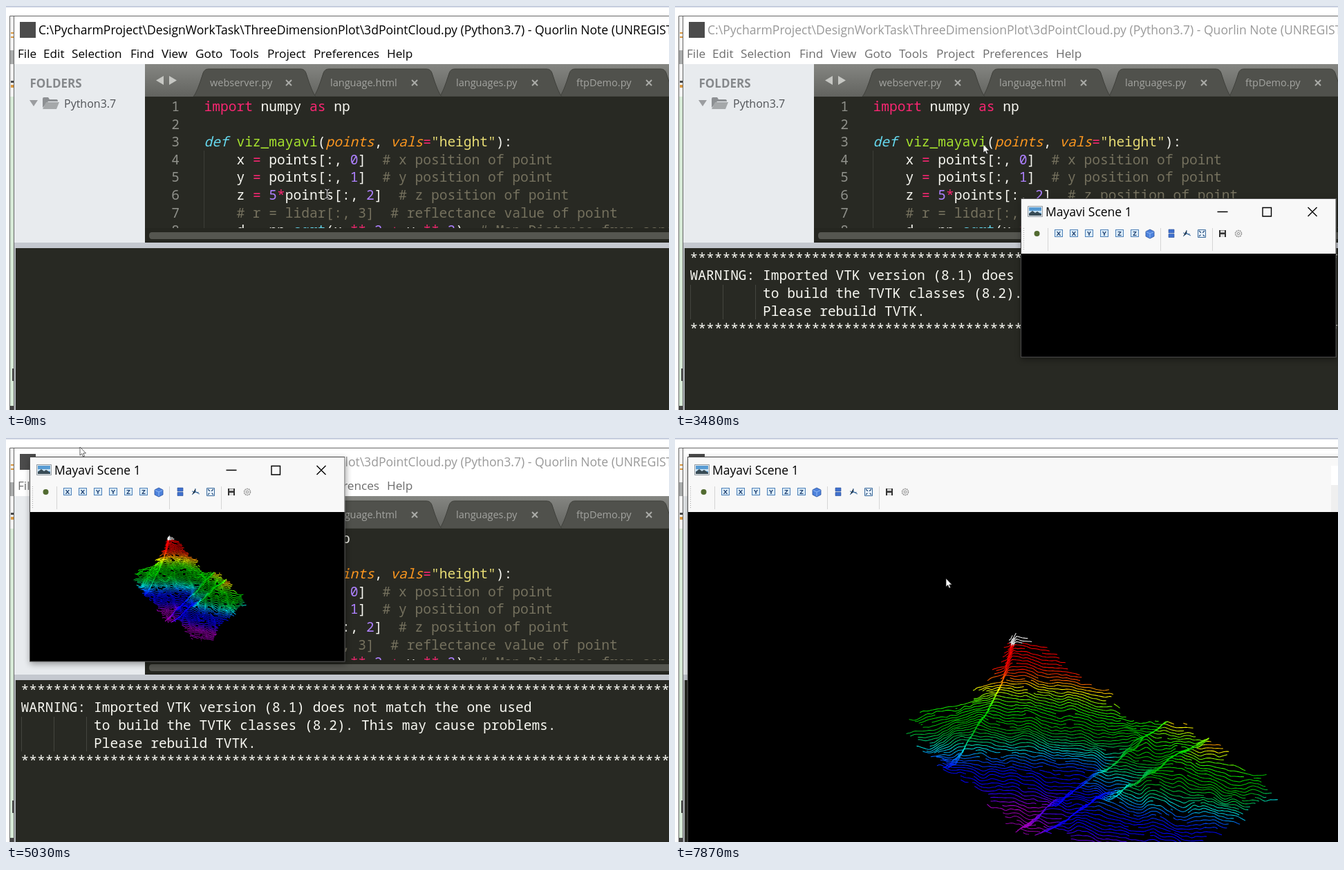
Write an HTML page that moves like this. It is 959 px wide and 584 px high and loops after 7990 ms.

```html
<!DOCTYPE html>
<html lang="en">
<head>
<meta charset="utf-8">
<title>Point cloud viewer</title>
<style>
html, body { margin: 0; width: 100%; height: 100%; overflow: hidden; background: #fff; }
svg { display: block; }
#stage { width: 959px; height: 584px; }
text { white-space: pre; font-family: "Open Sans", "Noto Sans", sans-serif; }
.mono text { font-family: "Noto Sans Mono", "DejaVu Sans Mono", monospace; font-size: 19.56px; fill: #f8f8f2; }
.k { fill: #f92672; } .n { fill: #ae81ff; } .s { fill: #e6db74; } .f { fill: #a6e22e; }
.c { fill: #75715e; } .b { fill: #66d9ef; }
.d { fill: #66d9ef; font-style: italic; } .a { fill: #fd971f; font-style: italic; }
#numbers text { fill: #8f908a; text-anchor: end; }
#tabs text { font-size: 14.5px; fill: #a3a4a0; }
#menu text { font-size: 17.2px; }
#mesh path { fill: none; stroke-width: 1.05; vector-effect: non-scaling-stroke; stroke-linejoin: round; }
</style>
</head>
<body>
<svg id="stage" viewBox="0 0 959 584">
  <defs>
    <linearGradient id="bar" x2="0" y2="1"><stop stop-color="#858682"/><stop offset="1" stop-color="#62635f"/></linearGradient>
    <filter id="soft" x="-10%" y="-10%" width="120%" height="120%"><feGaussianBlur stdDeviation="5"/></filter>
    <clipPath id="code-clip"><path d="M201 131H959V321H201z"/></clipPath>
  </defs>

  <g id="desktop">
    <path fill="#fff" d="M0 0H959V584H0z"/>
    <path fill="#c6cede" d="M0 0H959V2H0z"/>
    <path fill="#d6e9d6" d="M6 131H11V584H6z"/>
    <path fill="#f1f1f1" d="M6 15H11V131H6z"/>
    <path fill="#d7963f" d="M7 38h4v2h-4zM7 44h4v2h-4zM7 114h4v4h-4z"/>
    <path fill="#a9abab" d="M6 64h5v20h-5z"/>
    <path fill="#444" d="M7 108h4v3h-4zM9 524h2v18h-2zM6 578h5v6h-5z"/>
    <path fill="none" stroke="#666" d="M5.500 584V14.500H959M11.500 15V584"/>
  </g>

  <g id="editor">
    <path fill="#fff" d="M12 15H959V84H12z"/>
    <path fill="#4b4b4b" d="M20 23h23v23h-23z"/>
    <text id="title" x="47" y="41" font-size="17.55">C:\PycharmProject\DesignWorkTask\ThreeDimensionPlot\3dPointCloud.py (Python3.7) - Quorlin Note (UNREGISTERED)</text>
    <g id="menu"></g>
    <path fill="#e8ebee" d="M12 84H201V342H12z"/>
    <text x="34.500" y="118" font-size="17" font-weight="700" fill="#85888b">FOLDERS</text>
    <path fill="#9b9da0" d="M34 136h12l-6 9z"/>
    <path fill="#8d9093" d="M53 147v-13q0-2 2-2h6l2 3h10q2 0 2 3h-14z"/>
    <path fill="#a5a8aa" d="M53 149l5-10h19l-4 10z"/>
    <text x="84" y="146.500" font-size="16" fill="#505357">Python3.7</text>
    <path fill="url(#bar)" d="M201 84H959V131H201z"/>
    <path fill="#c6c7c3" d="M228 101v13l-11-6.500zM236 101v13l11-6.500z"/>
    <g id="tabs"></g>
    <path fill="#282923" d="M201 131H959V342H201z"/>
    <path id="line-mark" fill="#3a392f" d="M201 311H279V321H201z"/>
    <g class="mono" clip-path="url(#code-clip)">
      <path stroke="#3d3e37" d="M286.500 209V321"/>
      <g id="numbers"></g>
      <g id="code"></g>
    </g>
    <path fill="#252620" d="M201 321H959V342H201z"/>
    <path fill="#555650" d="M211 327H959V337H211q-4 0-4-5t4-5z"/>
    <path fill="#c4c8cf" d="M12 342H959V350H12z"/>
    <path fill="#b4b8bd" d="M12 350h2V584h-2z"/>
    <path fill="#282923" d="M14 350H959V584H14z"/>
    <g id="output" class="mono">
      <path stroke="#44453e" d="M22.500 403V453M69.500 403V453M116.500 403V453"/>
    </g>
    <path id="caret" fill="#f8f8f0" d="M20 351h2.500v28h-2.500z"/>
  </g>

  <rect id="shadow" fill="#000" opacity=".38" filter="url(#soft)"/>
  <svg id="viewer" overflow="hidden">
    <rect id="frame" fill="#f8f8f8"/>
    <path id="unpainted-title" fill="#fff"/>
    <path id="unpainted-tools" fill="#efefef"/>
    <g transform="translate(10 11)">
      <path fill="#e9edf0" stroke="#929ba3" d="M.5.5h21v15h-21z"/>
      <path fill="#579bd3" d="M2 2h18v12H2z"/>
      <path fill="#c5dff0" d="M2 7h18v3H2z"/>
      <path fill="#384b55" d="M2 14v-3l5-4 4 3 3-2 6 4v2z"/>
    </g>
    <text x="36" y="25.500" font-size="17.5">Mayavi Scene 1</text>
    <g id="buttons" fill="none" stroke="#000" stroke-width="1.4">
      <path d="M-172 19.500h15M-106.500 13.500h12.500v12.500h-12.500zM-41 13l13 13M-28 13l-13 13"/>
    </g>
    <g id="tools">
      <path stroke="#aaa" stroke-dasharray="1 2" d="M4.500 43V76"/>
      <path stroke="#d5d5d5" d="M39.500 43V76M202.500 43V76M277.500 43V76"/>
      <circle cx="23.500" cy="51" r="4" fill="#526b31"/>
      <path fill="#4d82dc" stroke="#254f9c" stroke-width=".8" d="M187 45l6 3v7l-6 3-6-3v-7z"/>
      <path fill="none" stroke="#91b8f3" d="M181.500 48.500l5.500 2.500 5.500-2.500M187 51v6"/>
      <path fill="#3f70ce" stroke="#294f96" stroke-width=".6" d="M214 45h8v5h-8zM214 51.500h8v5h-8z"/>
      <path stroke="#3c6c9e" d="M240 46v5l-5 4M240 51l6 3M235 50l10 2"/>
      <path fill="#e8f1fa" stroke="#3c6c9e" d="M256.500 45.500h11v11h-11z"/>
      <path stroke="#224b7a" stroke-width="1.3" stroke-dasharray="4 4" d="M258 47l8 8M266 47l-8 8"/>
      <path fill="#333" d="M287 46h10v10h-10z"/>
      <path fill="#ddd" d="M289 46.500h6v3h-6zM289 52h6v4h-6z"/>
      <circle cx="315" cy="51" r="4.500" fill="#eee" stroke="#999" stroke-width="1.6" stroke-dasharray="2 .8"/>
      <circle cx="315" cy="51" r="1.700" fill="none" stroke="#999"/>
    </g>
    <rect id="canvas" y="80" fill="#000"/>
    <g id="mesh"></g>
    <rect id="border" x=".5" y=".5" fill="none" stroke="#4b4b4b"/>
  </svg>

  <g id="pointer">
    <g id="beam" fill="none">
      <path stroke="#222" stroke-width="3" d="M-3-6.500Q0-6.500 0-4V4Q0 6.500-3 6.500M3-6.500Q0-6.500 0-4M0 4Q0 6.500 3 6.500"/>
      <path stroke="#eee" d="M-3-6.500Q0-6.500 0-4V4Q0 6.500-3 6.500M3-6.500Q0-6.500 0-4M0 4Q0 6.500 3 6.500"/>
    </g>
    <path id="arrow" fill="#fff" stroke="#222" stroke-width=".7" d="M0 0V12L2.700 9.600 4.600 14 6.500 13.200 4.700 9H8.500z"/>
    <path id="sizer" fill="#fff" stroke="#222" stroke-width=".7" d="M-6-6h5l-1.600 1.600 7 7L6 1V6H1L2.600 4.400l-7-7L-6-1z"/>
  </g>
</svg>

<script>
const LOOP = 7990, FRAME = 125;
const $ = id => document.getElementById(id);
const mix = (a, b, u) => a + (b - a) * u;
const clamp = u => Math.max(0, Math.min(1, u));
const span = (t, from, to) => clamp((t - from) / (to - from));

function make(parent, tag, attrs, content) {
  const el = document.createElementNS("http://www.w3.org/2000/svg", tag);
  for (const name in attrs) el.setAttribute(name, attrs[name]);
  if (content !== undefined) el.textContent = content;
  parent.append(el);
  return el;
}
const set = (id, attrs) => {
  for (const name in attrs) $(id).setAttribute(name, attrs[name]);
};
const show = (id, on) => $(id).setAttribute("visibility", on ? "visible" : "hidden");

// Straight travel through a few [time, x, y] points.
function glide(points, t) {
  const next = points.findIndex(p => p[0] > t);
  if (next === 0) return points[0].slice(1);
  if (next < 0) return points[points.length - 1].slice(1);
  const a = points[next - 1], b = points[next];
  const u = span(t, a[0], b[0]);
  return [mix(a[1], b[1], u), mix(a[2], b[2], u)];
}

// ---- static text ----
[["File", 17], ["Edit", 54], ["Selection", 95], ["Find", 180], ["View", 225], ["Goto", 274],
 ["Tools", 324], ["Project", 378], ["Preferences", 445], ["Help", 551]]
  .forEach(([word, x]) => make($("menu"), "text", { x, y: 75 }, word));

[["ftpDemo.py", 825, 930], ["languages.py", 651, 765], ["language.html", 469, 591], ["webserver.py", 295, 409]]
  .forEach(([name, x, cross]) => {
    const l = x - 24, r = cross + 39;
    make($("tabs"), "path", { fill: "#50514c", stroke: "#3f403b",
      d: `M${l} 131Q${l + 5} 126 ${l + 14} 97Q${l + 16} 91 ${l + 22} 91H${r - 22}Q${r - 16} 91 ${r - 14} 97Q${r - 5} 126 ${r} 131z` });
    make($("tabs"), "text", { x, y: 116 }, name);
    make($("tabs"), "path", { stroke: "#abaca8", "stroke-width": 2, d: `M${cross - 4} 107l8 8m0-8l-8 8` });
  });

const code = [
  [["k", "import"], ["", " numpy "], ["k", "as"], ["", " np"]],
  [],
  [["d", "def"], ["f", " viz_mayavi"], ["", "("], ["a", "points"], ["", ", "], ["a", "vals"], ["k", "="], ["s", '"height"'], ["", "):"]],
  [["", "    x "], ["k", "="], ["", " points[:, "], ["n", "0"], ["", "]  "], ["c", "# x position of point"]],
  [["", "    y "], ["k", "="], ["", " points[:, "], ["n", "1"], ["", "]  "], ["c", "# y position of point"]],
  [["", "    z "], ["k", "="], ["n", " 5"], ["k", "*"], ["", "points[:, "], ["n", "2"], ["", "]  "], ["c", "# z position of point"]],
  [["c", "    # r = lidar[:, 3]  # reflectance value of point"]],
  [["", "    d "], ["k", "="], ["", " np."], ["b", "sqrt"], ["", "(x "], ["k", "**"], ["n", " 2 "], ["k", "+"], ["", " y "], ["k", "**"], ["n", " 2"], ["", ")  "], ["c", "# Map Distance from sensor"]]
];
code.forEach((tokens, i) => {
  const y = 152 + i * 25.6;
  make($("numbers"), "text", { x: 251, y }, i + 1);
  const line = make($("code"), "text", { x: 286.5, y });
  tokens.forEach(([kind, part]) => make(line, "tspan", { class: kind }, part));
});

const stars = "*".repeat(82);
[stars, "WARNING: Imported VTK version (8.1) does not match the one used",
 "         to build the TVTK classes (8.2). This may cause problems.",
 "         Please rebuild TVTK.", stars]
  .forEach((line, i) => make($("output"), "text", { x: 21.5, y: 370.8 + i * 25.6 }, line));

[..."XXYYZZ"].forEach((axis, i) => {
  const x = 55 + i * 22;
  make($("tools"), "rect", { x: x - 5.5, y: 45.5, width: 11, height: 10, fill: "#dcecf8", stroke: "#4c80b8" });
  make($("tools"), "text", { x, y: 54.3, "font-size": 9.5, "font-weight": 700, fill: "#1d3f70", "text-anchor": "middle" }, axis);
});

// ---- terrain: scan lines that climb along three ridges ----
const SUMMIT = [406, 190], THROW = 27;
const outline = [
  [403, 189], [414, 189], [450, 214], [474, 248], [498, 262], [520, 310], [582, 320], [622, 352], [634, 374],
  [673, 408], [668, 427], [636, 440], [628, 468], [574, 500], [568, 554], [494, 543], [452, 500], [446, 478],
  [402, 486], [345, 412], [308, 362], [289, 345], [300, 310], [352, 296], [386, 255]];

const spur = y => 408 - 0.15 * Math.max(0, y - 200) - 0.0013 * Math.max(0, y - 200) ** 2;
const ridges = [
  { at: y => 550 - 1.04 * (y - 330), lean: 1.04 },
  { at: y => 590 - 1.33 * (y - 355), lean: 1.33 }
];

function rand(i, j) {
  const s = Math.sin(i * 127.1 + j * 311.7) * 43758.5453;
  return s - Math.floor(s) - 0.5;
}
function noise(x, y) {
  const i = Math.floor(x), j = Math.floor(y);
  const ease = u => u * u * (3 - 2 * u);
  const u = ease(x - i), v = ease(y - j);
  return mix(mix(rand(i, j), rand(i + 1, j), u), mix(rand(i, j + 1), rand(i + 1, j + 1), u), v);
}

function inside(x, y) {
  let hit = false;
  outline.forEach(([ax, ay], i) => {
    const [bx, by] = outline[(i + 1) % outline.length];
    if (ay > y !== by > y && x < (bx - ax) * (y - ay) / (by - ay) + ax) hit = !hit;
  });
  return hit;
}

function surface(x, base) {
  const crest = spur(base);
  let y = base + (x < crest ? 0.35 * (crest - x) : 0.2 * (x - crest)) - 20 * clamp((x - crest) / 9 + 0.5);
  for (const { at, lean } of ridges) y -= THROW * clamp((x - at(y)) / (THROW * lean));
  const rough = 0.35 + 0.65 * span(y, 220, 350);
  return y + rough * (15 * noise(x / 26, base / 42) + 8 * noise(x / 11, base / 24)) + 3 * noise(x / 5, base / 8);
}

// Drop below the summit; the ground beyond each ridge lies higher.
function depth(x, y) {
  let drop = y - 0.2 * Math.max(0, x - 450) + Math.max(0, x - 640);
  for (const { at } of ridges) drop -= THROW * clamp((x - at(y)) / 10 + 0.5);
  return drop;
}

// Rainbow that lingers on red, green and blue.
function tint(drop) {
  if (drop < 203) return "#eee";
  const h = Math.max(0, (drop - 225) * 4 / 3);
  const hue = Math.min(292, h - 17 * Math.sin(h * Math.PI / 60));
  const light = 48 - 13 * Math.exp(-(((drop - 333) / 28) ** 2)) - 17 * span(drop, 425, 460);
  return `hsl(${hue.toFixed(0)} 100% ${light.toFixed(0)}%)`;
}

function buildMesh() {
  const bands = {};
  for (let k = 0; k < 112; k++) {
    const base = 150 + k * 4.2;
    const ragX = 20 * rand(k, 3), ragY = 8 * rand(k, 9);
    let last = null, lastBand = null;
    for (let x = 286; x <= 678; x += 2) {
      const y = surface(x, base);
      const gap = noise(x / 14, k * 7) > 0.4;
      if (gap || !inside(x + ragX * span(y, 200, 260), y + ragY)) { last = null; continue; }
      const point = `${(x - SUMMIT[0]).toFixed(1)} ${(y - SUMMIT[1]).toFixed(1)}`;
      const band = Math.round(depth(x, y) / 5) * 5;
      if (last) {
        bands[band] = (bands[band] || "") + (band === lastBand ? "L" + point : `M${last}L${point}`);
        lastBand = band;
      } else lastBand = null;
      last = point;
    }
  }
  for (const band in bands) make($("mesh"), "path", { d: bands[band], stroke: tint(+band) });
}
buildMesh();

// ---- motion ----
const windowPath = [[4000, 500, 278], [4250, 336, 139], [4375, 224, 51], [4500, 140, 27],
  [4750, 60, 27], [4875, 37, 27], [5000, 34, 27], [5250, 18, 27]];
const arrowPath = [[3500, 446, 200], [3625, 440, 205], [3875, 440, 205], [4250, 248, 61], [4375, 191, 21],
  [4750, 110, 10], [5000, 107, 13], [5250, 99, 13], [5375, 99, 13], [6125, 227, 151]];

const resizing = t => span(t, 6625, 7125);
const widening = t => 0.6 * span(t, 7250, 7375) + 0.4 * span(t, 7375, 7500);

function caretOpacity(t) {
  if (t < 120 || t >= 2950) return 0;
  const phase = (t + 410) % 1500;
  return Math.max(clamp((phase - 1380) / 360), clamp((phase + 120) / 360)) * clamp((940 - phase) / 120);
}

function pointerAt(t) {
  if (t < 3500) {
    const u = span(t, 0, 875);
    return ["beam", mix(464.5, 455.5, u) + 11 * Math.sin(u * Math.PI), mix(271.5, 194, u)];
  }
  if (t < 6250) return ["arrow", ...glide(arrowPath, t)];
  if (t < 6625) return ["sizer", 233, 157];
  if (t < 7375) return ["sizer", mix(364.5, 576, resizing(t)), mix(253, 389, resizing(t))];
  const u = span(t, 7500, 7875);
  return ["arrow", mix(571, 392, u), mix(384, 203, u)];
}

function meshMatrix(t) {
  if (t < 6625) return [.42, 0, 0, .42, 201, 115];
  const u = resizing(t), v = widening(t), size = mix(.492, 1, u);
  const wide = [1.369, .028, .072, .976, 470, 257];
  return [size, 0, 0, size, mix(218, 388, u), mix(122, 163, u)].map((n, i) => mix(n, wide[i], v));
}

function drawViewer(t) {
  const open = t >= 3500;
  for (const id of ["viewer", "shadow"]) $(id).style.display = open ? "" : "none";
  if (!open) return;
  const [x, y] = glide(windowPath, t);
  const u = resizing(t);
  let w = 456.5, h = t < 3750 ? 230 : 296.5, painted = w;
  if (t >= 6625) {
    w = mix(499, 1024, u);
    h = mix(333, 600, u);
    painted = u ? 469 : w;
  }
  if (t >= 7375) { w = 1400; h = 640; painted = 931; }
  const box = { width: w, height: h };
  set("viewer", { x, y, ...box });
  set("shadow", { x: x + 1, y: y + 3, ...box });
  set("frame", box);
  set("border", { width: w - 1, height: h - 1 });
  set("canvas", { width: w, height: h - 80 });
  set("unpainted-title", { d: `M${painted} 13H${w}V41H${painted}z` });
  set("unpainted-tools", { d: `M${painted} 41H${w}V80H${painted}z` });
  set("buttons", { transform: `translate(${w} 0)` });
  set("mesh", { transform: `matrix(${meshMatrix(t)})` });
  $("mesh").style.display = t >= 3750 ? "" : "none";
}

function draw(now) {
  const t = Math.floor((now + 35) / FRAME) * FRAME;
  const focused = now < 2950;
  set("title", { fill: focused ? "#000" : "#999" });
  set("menu", { fill: focused ? "#000" : "#6d6d6d" });
  show("line-mark", focused && now >= 120);
  show("output", now >= 1600);
  set("caret", { opacity: caretOpacity(now) });
  drawViewer(t);
  const [shape, x, y] = pointerAt(t);
  for (const id of ["beam", "arrow", "sizer"]) show(id, id === shape);
  set("pointer", { transform: `translate(${x} ${y})` });
}

const start = performance.now();
function tick() {
  draw((performance.now() - start) % LOOP);
  requestAnimationFrame(tick);
}
draw(0);
requestAnimationFrame(tick);
</script>
</body>
</html>
```
